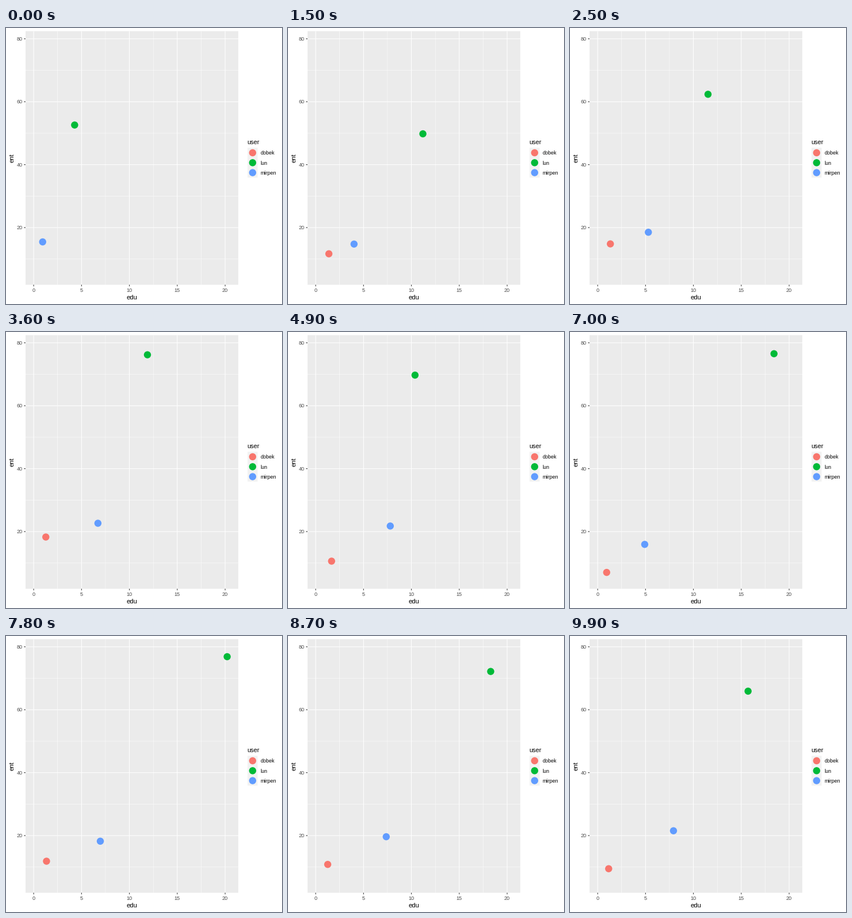
Animation of 480x480 px, one loop 10 s. Source, as a matplotlib script:

```python
import numpy as np
import matplotlib.pyplot as plt
from matplotlib.animation import FuncAnimation
from matplotlib.patches import Circle, Rectangle

SIZE, DPI = 480, 100
FRAMES, INTERVAL = 100, 100
PT = 72 / DPI
LEFT, TOP, RIGHT, BOTTOM = 34, 5.5, 404, 446.5

plt.rcParams["font.family"] = "Liberation Sans"
fig = plt.figure(figsize=(SIZE / DPI, SIZE / DPI), dpi=DPI, facecolor="white")
ax = fig.add_axes([0, 0, 1, 1])
ax.set_xlim(0, SIZE)
ax.set_ylim(SIZE, 0)
ax.axis("off")


def px(edu):
    return 48.1 + 16.65 * edu


def py(ent):
    return 347.1 - 5.472 * (ent - 20)


def line(xs, ys, width, color, z):
    ax.plot(xs, ys, lw=width * PT, color=color, zorder=z,
            solid_capstyle="butt", snap=False)


def label(x, y, s, size, color="black", ha="left", rotation=0):
    ax.text(x, y, s, fontsize=size * PT, color=color, ha=ha, va="baseline",
            rotation=rotation, rotation_mode="anchor")


def box(x0, y0, x1, y1, color):
    ax.add_patch(Rectangle((x0, y0), x1 - x0, y1 - y0, fc=color, ec="none",
                           zorder=0, snap=False))


def dot(x, y, color):
    return ax.add_patch(Circle((x, y), 6.2, fc=color, ec="none", zorder=4))


def vline(edu, width, z):
    line([px(edu)] * 2, [TOP, BOTTOM], width, "white", z)


def hline(ent, width, z):
    line([LEFT, RIGHT], [py(ent)] * 2, width, "white", z)


# Panel with grid, ticks and titles
box(LEFT, TOP, RIGHT, BOTTOM, "#EBEBEB")
for v in np.arange(2.5, 20, 5):
    vline(v, 0.53, 1)
for v in range(10, 80, 20):
    hline(v, 0.53, 1)
for v in range(0, 25, 5):
    vline(v, 1.07, 2)
    line([px(v)] * 2, [BOTTOM, BOTTOM + 2.75], 1.07, "#333333", 2)
    label(px(v), 459, str(v), 9.2, "#4D4D4D", "center")
for v in range(20, 100, 20):
    hline(v, 1.07, 2)
    line([LEFT - 2.75, LEFT], [py(v)] * 2, 1.07, "#333333", 2)
    label(29, py(v) + 3.2, str(v), 9.2, "#4D4D4D", "right")
label(219.3, 472, "edu", 11.2, ha="center")
label(13.2, 225.7, "ent", 11.2, ha="center", rotation=90)

# Weekly readings move at constant speed between the turning points
WEEKS = 13
turns = np.round(np.array([0, 2, 5, 6, 7, 8, 9, 10, 13])
                 * (FRAMES - 1) / WEEKS)
USERS = [  # name, colour, first frame, (edu, ent) at each turn
    ("dobek", "#F8766D", 8,
     [(0.2, 14.9), (1.38, 11.67), (1.26, 18.9), (2.64, 14.44), (0.36, 5.49),
      (0.23, 11.92), (0.87, 6.18), (1.36, 12.09), (1.15, 9.47)]),
    ("lun", "#00BA38", 0,
     [(4.28, 52.6), (11.2, 49.8), (11.95, 78.7), (14.3, 70.5), (5.15, 68.7),
      (9.38, 72.7), (18.05, 76.3), (20.64, 77.9), (15.71, 65.9)]),
    ("mirpen", "#619CFF", 0,
     [(0.94, 15.45), (4.01, 14.76), (6.97, 23.4), (7.57, 22.2), (8.09, 21.2),
      (2.49, 13.25), (4.59, 15.6), (6.87, 17.9), (7.92, 21.53)]),
]

# Legend
label(419.6, 202, "user", 11)
box(420.2, 208.3, 437.5, 260.2, "#F2F2F2")
dots = []
for i, (name, color, _, _) in enumerate(USERS):
    y = 217 + 17.28 * i
    dot(428.9, y, color)
    label(442.5, y + 3.5, name, 9)
    dots.append(dot(0, 0, color))


def update(frame):
    for (_, _, start, path), d in zip(USERS, dots):
        edu, ent = (np.interp(frame, turns, vals) for vals in zip(*path))
        d.center = px(edu), py(ent)
        d.set_visible(frame >= start)
    return dots


anim = FuncAnimation(fig, update, frames=FRAMES, interval=INTERVAL,
                     repeat=True, repeat_delay=0, blit=False)
plt.show()
```
